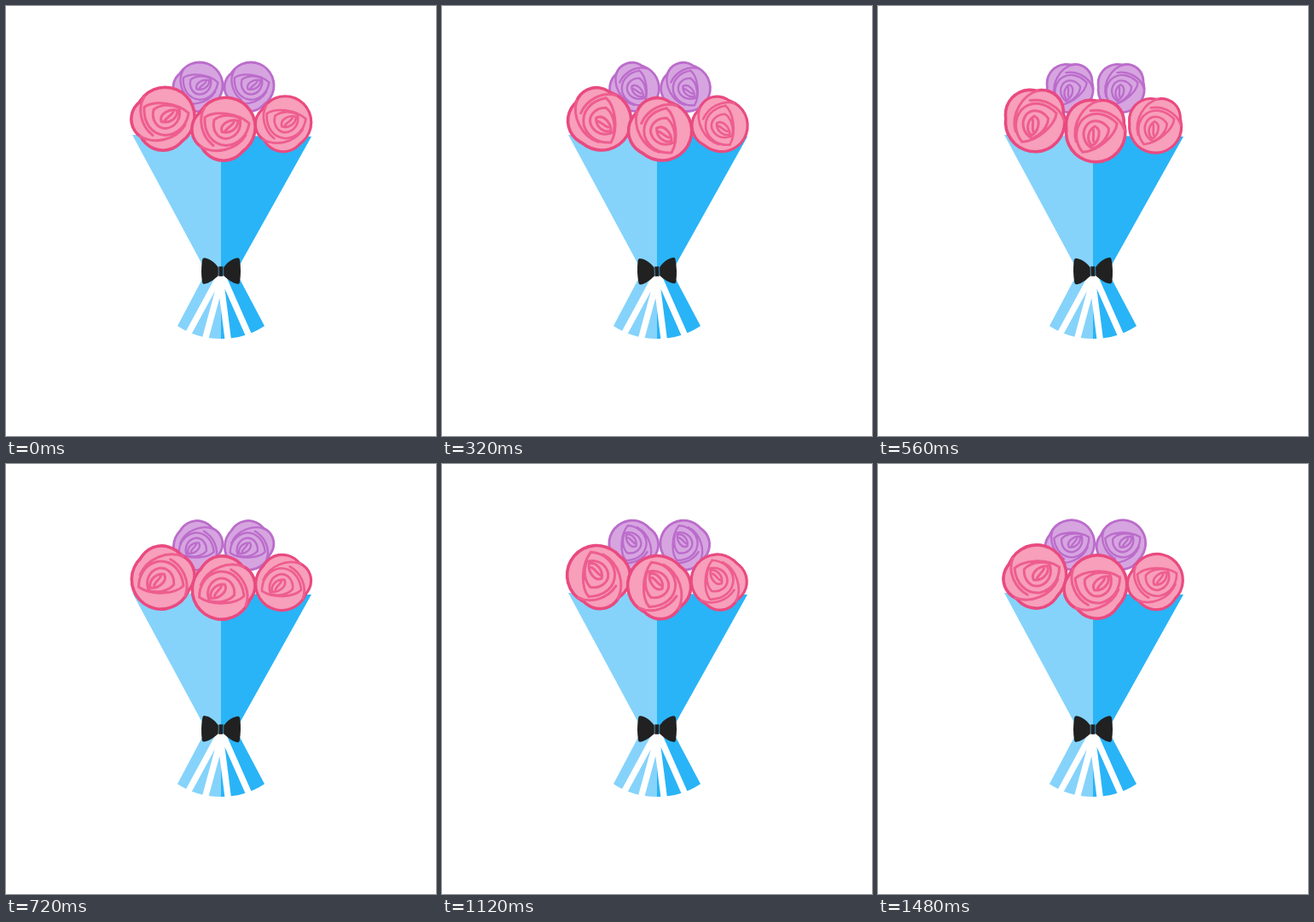
Animation of 504 by 504 pixels, one loop 1520 ms. Source, as an HTML page with a canvas:

```html
<!DOCTYPE html>
<html lang="en">
<head>
<meta charset="utf-8">
<title>Bouquet</title>
<style>
html, body { margin: 0; width: 100%; height: 100%; overflow: hidden; background: #fff; }
canvas { display: block; width: 504px; height: 504px; }
</style>
</head>
<body>
<canvas id="stage" width="504" height="504"></canvas>
<script>
const ctx = document.getElementById('stage').getContext('2d');
const LOOP = 1520, STEP = 40, TAU = Math.PI * 2;

const PINK = { fill: '#f79fbb', edge: '#e94a80', line: '#ee5d8f' };
const PURPLE = { fill: '#d6a5e0', edge: '#bb6ccb', line: '#bb6ccb' };

// Roses from back to front: x, y, scale, colours
const backRoses = [
  [225, 95, 0.78, PURPLE],
  [285, 95, 0.78, PURPLE]
];
const frontRoses = [
  [184, 132.5, 1, PINK],
  [325, 138.5, 0.88, PINK],
  [255, 144.5, 1, PINK]
];

// Overlapping lobes that make up the silhouette: x, y, radius
const lobes = [[2.5, -2.5, 36.5], [-12, 0, 27], [0, 8, 30.5]];

const folds = new Path2D(`
  M-22-26 C-31-11 -25 9 -12 19
  M-27 20 C-11 30 15 25 26 7
  M-22-14 C-11-22 16-20 30-7
  M-22-14 C-23 4 -14 18 3 19 C18 18 28 7 30-7
  M-11-11 C-14 1 -7 11 3 11 C14 10 22 0 19-13
  M-11-11 C-4-17 9-18 19-13`);
const bud = new Path2D('M-2 3 C-5-6 8-13 17-10 C17-1 8 6 -2 3 Z M2 2 C4-2 9-3 12-8');

const bowWing = new Path2D(`
  M-3.2-4.5 C-8-11 -14-15 -20-15.5 Q-21.5-15.5 -22-13
  Q-24 0 -22 13 Q-21.5 15.5 -19.5 15 C-13 14 -8 9.5 -3.2 5.5 Z`);

const wrapLeft = new Path2D('M148 151 L252 152 V390 A91.6 91.6 0 0 1 201 375 L234.6 311.4 Z');
const wrapRight = new Path2D('M358 153 L252 152 V390 A91.6 91.6 0 0 0 303 375 L269.4 311.4 Z');
const stems = new Path2D('M250 317 L213 385 M252 322 L233 392 M251 318 L260.6 394 M254.5 318 L285 387');

function fillLobes(color, inset) {
  ctx.fillStyle = color;
  for (const [x, y, r] of lobes) {
    ctx.beginPath();
    ctx.arc(x, y, r - inset, 0, TAU);
    ctx.fill();
  }
}

function drawRose([x, y, scale, colors], angle) {
  ctx.save();
  ctx.translate(x, y);
  ctx.rotate(angle);
  ctx.scale(scale, scale);
  fillLobes(colors.edge, 0);
  fillLobes(colors.fill, 3.6);
  ctx.strokeStyle = colors.line;
  ctx.lineWidth = 3;
  ctx.lineCap = ctx.lineJoin = 'round';
  ctx.stroke(folds);
  ctx.stroke(bud);
  ctx.restore();
}

function drawWrap() {
  ctx.fillStyle = '#85d3fb';
  ctx.fill(wrapLeft);
  ctx.fillStyle = '#29b4f7';
  ctx.fill(wrapRight);
  ctx.strokeStyle = '#fff';
  ctx.lineWidth = 7.4;
  ctx.lineCap = 'butt';
  ctx.stroke(stems);
  ctx.fillStyle = '#fff';
  ctx.fillRect(247, 316, 11, 9);
}

const tiltKeys = [[0, 0], [440, -2.2], [860, 2.2], [1180, 0], [LOOP, 0]];

function bowTilt(t) {
  const i = tiltKeys.findIndex(([time]) => time > t);
  const [t0, a] = tiltKeys[i - 1], [t1, b] = tiltKeys[i];
  const ease = (1 - Math.cos(Math.PI * (t - t0) / (t1 - t0))) / 2;
  return (a + (b - a) * ease) * Math.PI / 180;
}

function drawBow(t) {
  ctx.save();
  ctx.translate(252, 310.8);
  ctx.rotate(bowTilt(t));
  ctx.fillStyle = '#212121';
  ctx.fill(bowWing);
  ctx.fillRect(-2.6, -5.5, 5, 11.5);
  ctx.scale(-1, 1);
  ctx.fill(bowWing);
  ctx.restore();
}

function draw(t) {
  const angle = t / LOOP * TAU;
  ctx.fillStyle = '#fff';
  ctx.fillRect(0, 0, 504, 504);
  backRoses.forEach(rose => drawRose(rose, angle));
  drawWrap();
  frontRoses.forEach(rose => drawRose(rose, angle));
  drawBow(t);
}

const start = performance.now();
function tick() {
  const t = (performance.now() - start) % LOOP;
  draw(Math.floor(t / STEP) * STEP);
  requestAnimationFrame(tick);
}
tick();
</script>
</body>
</html>
```
